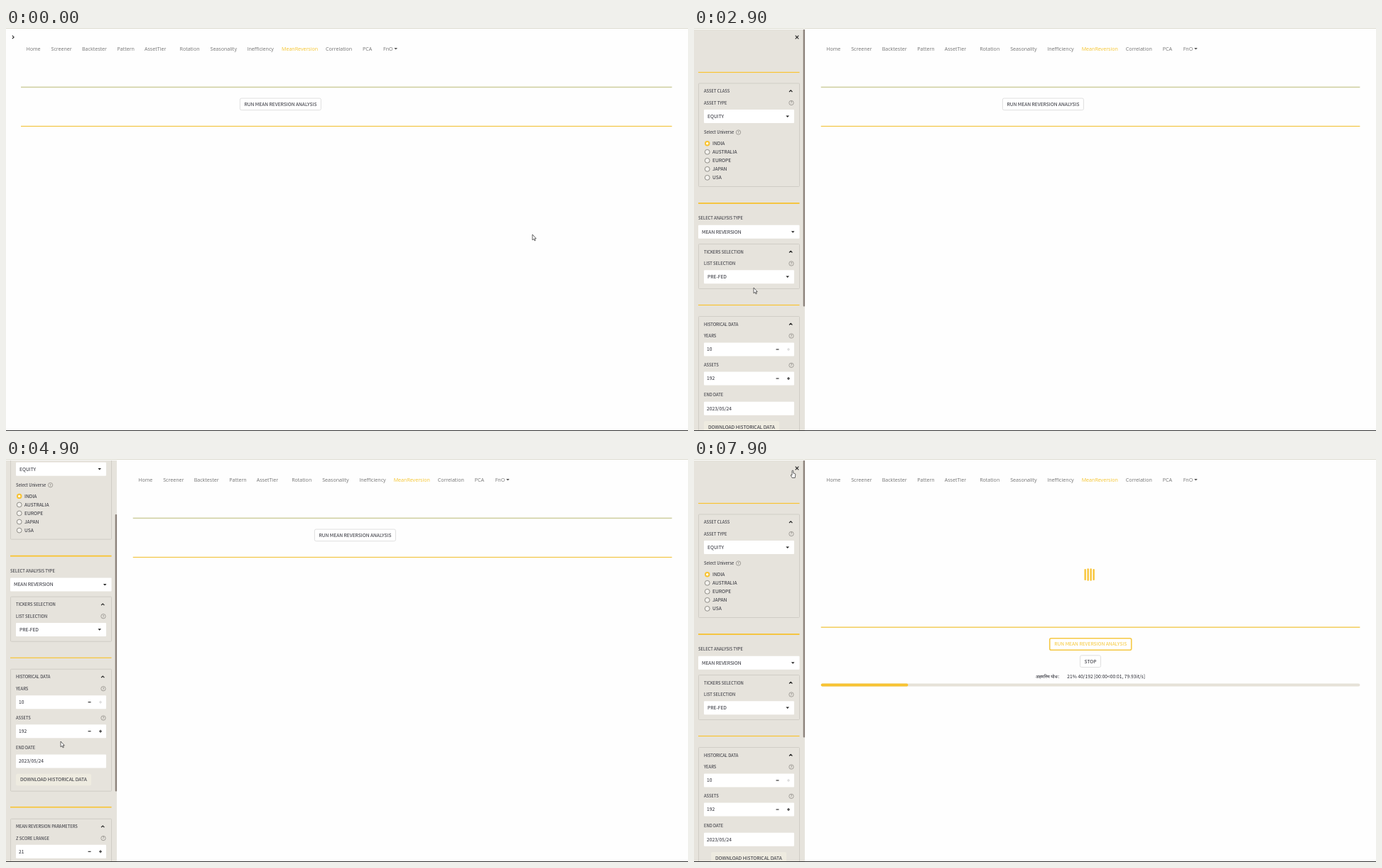
Write an HTML page that moves like this. It is 960x568 px and loops after 8000 ms.

```html
<!DOCTYPE html>
<html lang="en">
<head>
<meta charset="utf-8">
<title>Mean reversion dashboard</title>
<style>
html, body { margin: 0; width: 100%; height: 100%; overflow: hidden; background: #fefefe; }
svg { display: block; width: 960px; height: 568px; }
text { font: 6.7px "Noto Sans CJK JP", "Noto Sans CJK SC", "Noto Sans CJK", "Open Sans", sans-serif; fill: #262730; white-space: pre; }
text.small { font-size: 5.88px; }
text.nav { font: 7.1px "Open Sans", "Noto Sans", sans-serif; fill: #737373; }
text.active, .hot text { fill: #f5c52f; }
.hot rect { stroke: #f5c843; }
.icon { fill: none; stroke: #222; stroke-width: 1.1; }
.help { fill: none; stroke: #77756f; stroke-width: .6; }
text.mark { font-size: 5px; fill: #66645f; }
</style>
</head>
<body>
<svg id="stage" viewBox="0 0 960 568"></svg>
<script>
const LOOP = 8000, STEP = 100, SIDE = 157.7, AMBER = '#f8c332';
const stage = document.getElementById('stage');

// Text is placed by the vertical centre of its capitals.
const sizes = { small: 5.88, nav: 7.1, mark: 5 };
const text = (x, y, s, cls = '', extra = '') =>
  `<text x="${x}" y="${y + (sizes[cls.split(' ')[0]] || 6.7) * .366}" class="${cls}" ${extra}>${s}</text>`;
const rect = (x, y, w, h, fill, extra = '') =>
  `<rect x="${x}" y="${y}" width="${w}" height="${h}" fill="${fill}" ${extra}/>`;
const path = (d, extra = 'class="icon"') => `<path d="${d}" ${extra}/>`;
const caret = (x, y, fill = '#222') => path(`M${x - 2.3} ${y - 1.1}h4.6l-2.3 2.5z`, `fill="${fill}"`);
const help = (x, y) => `<circle cx="${x}" cy="${y}" r="3.2" class="help"/>` +
  text(x, y, '?', 'mark', 'text-anchor="middle"');
const label = (y, s) => text(14, y, s, 'small') + help(137, y);
const field = (y, s, x = 14, w = 127, pad = 4) =>
  rect(x, y - 9.5, w, 19, '#fff', 'rx="1"') + text(x + pad, y, s);
const select = (y, s, x = 14, w = 127) => field(y, s, x, w, 5) + caret(x + w - 9.3, y);
const number = (y, s, plus = '#222') => field(y, s) + path(`M115.5 ${y}h4`) +
  path(`M131 ${y}h4m-2 -2v4`, `fill="none" stroke="${plus}" stroke-width="1.1"`);
const rule = (y, h) => rect(6, y - h / 2, 142.5, h, AMBER);
const panel = (top, bottom, title) =>
  rect(6.5, top, 142, bottom - top, 'none', 'rx="1" stroke="#cbc8c0" stroke-width=".8"') +
  text(14, top + 11, title, 'small') + path(`M134 ${top + 12}l2.2 -2.2 2.2 2.2`);
const radio = (y, s, on) => on
  ? `<circle cx="18.7" cy="${y}" r="2.7" fill="#fff" stroke="${AMBER}" stroke-width="2"/>` + text(26, y, s)
  : `<circle cx="18.7" cy="${y}" r="3.4" fill="#f4f2ee" stroke="#77756f" stroke-width=".8"/>` + text(26, y, s);
const button = (w, s, border = '#dcdcdc', width = .9) =>
  rect(-w / 2, -8.3, w, 16.6, '#fff', `rx="2" stroke="${border}" stroke-width="${width}"`) +
  text(0, 0, s, '', 'text-anchor="middle"');

const navItems = [['Home', 28.5], ['Screener', 63.5], ['Backtester', 107], ['Pattern', 156.5],
  ['AssetTier', 195], ['Rotation', 244.5], ['Seasonality', 287.5], ['Inefficiency', 339.5],
  ['MeanReversion', 388], ['Correlation', 450], ['PCA', 502], ['FnO', 531]];
const nav = navItems.map(([s, x]) =>
  text(x, 29, s, s === 'MeanReversion' ? 'nav active' : 'nav')).join('') + caret(548.7, 29, '#555');

const sidebar =
  path('M142.7 10.7l4.6 4.6m0 -4.6l-4.6 4.6') + rule(62.5, 1.2) +
  panel(78, 223.5, 'ASSET CLASS') + label(105.5, 'ASSET TYPE') + select(124.5, 'EQUITY') +
  text(14, 147, 'Select Universe', 'small') + help(62.5, 147) +
  ['INDIA', 'AUSTRALIA', 'EUROPE', 'JAPAN', 'USA'].map((s, i) => radio(162.7 + i * 12.05, s, !i)).join('') +
  rule(247, 1.8) + text(6, 268.3, 'SELECT ANALYSIS TYPE', 'small') + select(287.3, 'MEAN REVERSION', 6, 142.5) +
  panel(304.5, 367.5, 'TICKERS SELECTION') + label(332, 'LIST SELECTION') + select(350.7, 'PRE-FED') +
  rule(390.5, 1.2) +
  panel(406.5, 578.5, 'HISTORICAL DATA') + label(434, 'YEARS') + number(453, '10', '#d5d5d5') +
  label(475.3, 'ASSETS') + number(494, '192') +
  text(14, 516.7, 'END DATE', 'small') + field(536.3, '2023/05/24') +
  `<g id="download">${rect(14, 554, 106, 16.5, '#eeebe0', 'rx="2"')}${text(20, 562.3, 'DOWNLOAD HISTORICAL DATA')}</g>` +
  rule(601, 1.6) + panel(617.5, 782, 'MEAN REVERSION PARAMETERS') +
  ['L', 'M', 'H'].map((c, i) => label(644.8 + i * 41.3, `Z SCORE ${c}RANGE`) +
    number(663.6 + i * 41.3, 21 * (i + 1))).join('') +
  `<circle cx="18.7" cy="769" r="4" fill="${AMBER}"/>` +
  path('M16.8 769l1.4 1.5 2.5 -3', 'fill="none" stroke="#fff" stroke-width="1"') + text(27, 769, '3D PLOT');

stage.innerHTML = `
  <clipPath id="view"><rect y="2" width="157" height="565"/></clipPath>
  ${rect(0, 0, 960, 568, '#fefefe')}
  <g id="toggle">${rect(2.5, 5.5, 15, 15, '#eeebe2', 'id="toggleHover" stroke="#dedace" stroke-width=".8"')}
    ${path('M8.8 10.6l2.3 2.3 -2.3 2.3')}</g>
  <g id="nav">${nav}</g>
  <g id="idle">
    ${rect(0, 82.6, 0, 1.6, '#cfd0a2', 'class="line"')}
    ${rect(0, 137.9, 0, 1.2, '#f2c643', 'class="line"')}
    <g id="run">${button(114, 'RUN MEAN REVERSION ANALYSIS')}</g>
  </g>
  <g id="busy">
    <g id="spinner" fill="${AMBER}">${[0, 1, 2, 3].map(i => rect(549.5 + i * 4, 155, 2.3, 16, AMBER, 'rx="1"')).join('')}</g>
    ${rect(178.7, 236.5, 758.7, 1.3, '#f2c643')}
    <g class="hot" transform="translate(558.2 261)">${button(115, 'RUN MEAN REVERSION ANALYSIS', AMBER, 1.6)}</g>
  </g>
  <g id="progress">
    <g transform="translate(558 285.2)">${button(29, 'STOP')}</g>
    ${text(481, 307, 'अहमस्मि योधः:')}${text(635, 307, '', '', 'id="count" text-anchor="end"')}
    ${rect(178.7, 316.6, 758.7, 3.8, '#e6e2d8', 'rx="1.9"')}
    ${rect(178.7, 316.6, 0, 3.8, AMBER, 'rx="1.9" id="fill"')}
  </g>
  <g id="side"><g clip-path="url(#view)">${rect(0, 2, 156, 565, '#e6e3dc')}
    <g id="scroll">${sidebar}</g>
    ${rect(153.7, 2, 2.4, 390.5, '#8c827b', 'rx="1" id="thumb"')}</g></g>
  ${rect(0, 0, 960, 1, '#dcdbcf')}${rect(0, 567, 960, 1, '#333')}
  <g id="cursor" fill="#fff" stroke="#333" stroke-width=".75" stroke-linejoin="round">
    <path id="arrow" d="M0 0V7.8L1.8 6.3L3.1 8.9L4.3 8.3L3 5.8H5.3Z"/>
    <path id="hand" d="M-1 1a.9.9 0 0 1 1.8 0V4L3 4.5Q4 4.8 3.8 6L3.2 10.5H-.8L-2.8 7Q-2.8 5.8-1 6.8Z"/>
  </g>`;

const el = id => document.getElementById(id);
const show = (id, on) => el(id).setAttribute('display', on ? 'inline' : 'none');
const move = (id, x, y) => el(id).setAttribute('transform', `translate(${x} ${y})`);
const clamp = v => Math.max(0, Math.min(1, v));
const within = (t, a, b) => t >= a && t < b;

// Keys are [time, ...values], joined by straight lines.
function track(keys, t) {
  let i = 0;
  while (i < keys.length - 2 && t >= keys[i + 1][0]) i++;
  const [a, b] = [keys[i], keys[i + 1]], k = clamp((t - a[0]) / (b[0] - a[0]));
  return a.slice(1).map((v, n) => v + (b[n + 1] - v) * k);
}
const cursorKeys = [[0, 741, 291], [300, 17, 150], [600, 35, 94], [1000, 12, 19], [1200, 11, 17],
  [1700, 11, 17], [2300, 68, 197], [2500, 72, 236], [2900, 84, 366], [3600, 84, 403], [4400, 80, 399],
  [4900, 77, 398], [5600, 77, 398], [6200, 427, 124], [6300, 457, 111], [7100, 457, 111],
  [7700, 141, 19], [7900, 139, 16]];
const scrollKeys = [[2900, 0], [3600, 217], [3900, 253], [4400, 253], [4900, 110.3], [5500, 0]];

function draw(t) {
  const open = 1 - (1 - clamp((t - 1600) / 300)) ** 3;
  const left = 21 + SIDE * open;
  const running = t >= 6600;

  show('toggle', open < .1);
  show('toggleHover', t >= 900);
  move('nav', SIDE * open, 0);
  move('side', -SIDE * (1 - open), 0);
  for (const line of document.querySelectorAll('.line')) {
    line.setAttribute('x', left);
    line.setAttribute('width', 937.4 - left);
  }
  move('run', 386.4 + 105 * open, 107.4);
  el('run').setAttribute('class', t >= 6300 ? 'hot' : '');
  show('idle', !running);
  show('busy', running);
  show('progress', t >= 6900);

  const [scroll] = track(scrollKeys, t);
  move('scroll', 0, -scroll);
  el('thumb').setAttribute('y', 2 + scroll * .69);
  move('download', running ? 10 : 0, 0);

  [...el('spinner').children].forEach((bar, i) => {
    const h = 16 + 2 * Math.sin((t - 7900) / 160 + i * Math.PI / 3);
    bar.setAttribute('y', 163 - h / 2);
    bar.setAttribute('height', h);
  });
  const done = time => Math.max(0, (time - 7400) * .08);
  const n = Math.round(done(t));
  el('count').textContent = `${Math.round(n / 1.92)}% ${n}/192 ` +
    (n ? `[00:00<00:0${n < 33 ? 2 : 1}, 79.93it/s]` : '[00:00<?, ?it/s]');
  el('fill').setAttribute('width', 758.7 * done(t - 112) / 192);

  const hand = within(t, 1000, 1800) || within(t, 3500, 3700) || within(t, 6300, 7200) || t >= 7700;
  move('cursor', ...track(cursorKeys, t));
  show('cursor', !within(t, 400, 600));
  show('hand', hand);
  show('arrow', !hand);
}

const start = performance.now();
function frame() {
  const t = (performance.now() - start) % LOOP;
  draw(Math.floor(t / STEP) * STEP);
  requestAnimationFrame(frame);
}
frame();
</script>
</body>
</html>
```
